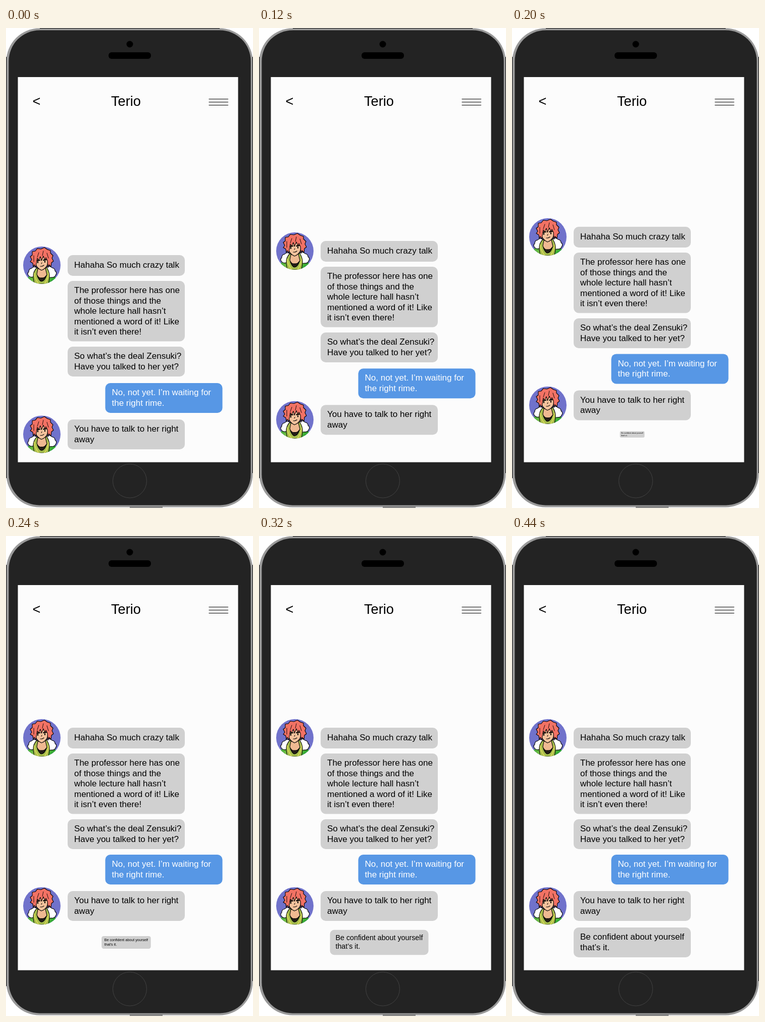
These frames come from a looping animation (489 by 949 pixels, 640 ms). An HTML page:

```html
<!DOCTYPE html>
<html lang="en">
<head>
<meta charset="utf-8">
<title>Chat</title>
<style>
  html, body { margin: 0; width: 100%; height: 100%; overflow: hidden; background: #fff; }
  svg { display: block; font: 17px "Liberation Sans", Arial, sans-serif; }
</style>
</head>
<body>
<svg width="489" height="949" viewBox="0 0 489 949">
  <defs>
    <clipPath id="round"><circle cx="37" cy="37" r="37"/></clipPath>
    <linearGradient id="coat" x1="0" x2="1" y1="0" y2=".3">
      <stop offset="0" stop-color="#1f9a35"/>
      <stop offset=".5" stop-color="#8fce4a"/>
      <stop offset="1" stop-color="#18a02c"/>
    </linearGradient>
    <g id="avatar" clip-path="url(#round)" stroke-linejoin="round" stroke-linecap="round">
      <rect width="74" height="74" fill="#7072cb"/>
      <g stroke="#000" stroke-width="1.1">
        <path d="M4 74L10 60L22 55H50L62 58L72 74Z" fill="url(#coat)" stroke="none"/>
        <path d="M27 42Q21 38 17 43Q11 44 11 50Q7 54 11 58Q14 62 20 60L25 61L29 50Z" fill="#fff"/>
        <path d="M46 41Q53 37 57 42Q63 43 63 48Q68 52 64 57Q62 62 56 61L49 62L43 50Z" fill="#fff"/>
        <path d="M27 42Q19 50 20 62L22 74H50L52 62Q53 50 46 41L37 48Z" fill="#a5bd4c"/>
        <path d="M29 44L27 55L34 68H39L47 56L44 43Z" fill="#efb991"/>
        <path d="M28 58Q31 67 36 69Q43 68 46 57Q42 63 37 62Q32 63 28 58Z" fill="#251f18"/>
        <path d="M22 53Q23 64 31 74M50 53Q49 65 42 74" fill="none" stroke="#d8d657" stroke-width="2"/>
        <path d="M24 22L25 36Q28 43 36 47Q45 44 48 36L50 20L38 12Z" fill="#f3c29c"/>
        <path d="M27 28L33 27M40 27L46 26" fill="none" stroke-width="2"/>
        <path d="M29 30V32M43 29V31" fill="none" stroke-width="2"/>
        <path d="M34 39Q38 40 41 37M37 32L36 34" fill="none"/>
        <path d="M20 40L19 33L14 30L17 26L14 20L18 17L18 10L24 9L28 4L35 5L42 2L48 6L54 8L54 13L59 18L57 23L60 29L56 32L55 40L51 36L49 42L48 28L45 22L43 27L40 19L36 28L34 20L30 28L28 23L26 34L25 41L22 36Z" fill="#f27264"/>
        <path d="M31 12L28 21M40 9L38 18M47 13L50 23M21 18L21 30" fill="none" stroke-width=".9"/>
      </g>
    </g>
  </defs>

  <rect x=".5" y=".5" width="488" height="947" rx="66" fill="#999"/>
  <path d="M67 .5H423M.5 57V890M488.5 57V880M245 947.5H310" stroke="#111" fill="none"/>
  <rect x="5.5" y="4.5" width="479" height="939" rx="61" fill="#232323"/>
  <circle cx="245" cy="32" r="6.5"/>
  <rect x="203" y="48" width="84" height="13" rx="6"/>
  <circle cx="245" cy="895.5" r="33.5" fill="none" stroke="#424242"/>
  <rect x="23.5" y="97" width="436" height="761.5" fill="#fcfcfc"/>

  <g font-size="27.2">
    <text x="52.5" y="154">&lt;</text>
    <text x="208" y="154">Terio</text>
  </g>
  <path d="M401.5 140.5H440M401.5 146.5H440M401.5 152.5H440" stroke="#000"/>

  <g id="upper"></g>
  <g id="lower"></g>
  <g id="reply"></g>
</svg>
<script>
const STEP = 40, LOOP = 640;
const GREY = '#d0d0d0', BLUE = '#5797e5';
const el = id => document.getElementById(id);

function bubble(x, y, h, base, lines, fill = GREY, ink = '#000') {
  const text = lines.map((s, i) =>
    `<text x="${x + 13}" y="${y + base + i * 20.4}" fill="${ink}">${s}</text>`).join('');
  return `<rect x="${x}" y="${y}" width="232" height="${h}" rx="10" fill="${fill}"/>${text}`;
}
const avatar = y => `<use href="#avatar" x="34" y="${y}"/>`;

el('upper').innerHTML = avatar(362) +
  bubble(122, 379, 41, 25, ['Hahaha So much crazy talk']) +
  bubble(122, 430, 119.5, 24.3, ['The professor here has one', 'of those things and the',
    'whole lecture hall hasn’t', 'mentioned a word of it! Like', 'it isn’t even there!']) +
  bubble(122, 560, 59, 24.3, ['So what’s the deal Zensuki?', 'Have you talked to her yet?']);
el('lower').innerHTML =
  bubble(196.5, 630, 59, 24.3, ['No, not yet. I’m waiting for', 'the right rime.'], BLUE, '#fff') +
  avatar(694.3) +
  bubble(122, 702, 59, 24.3, ['You have to talk to her right', 'away']);
el('reply').innerHTML =
  bubble(122, 774, 59, 24.3, ['Be confident about yourself', 'that’s it.']);

// [step, value] keys with straight lines between them
const slide = [[1, 1], [6, 0]];
const pop = [[4, 0], [9, 1.05], [11, 1]];

function valueAt(keys, n) {
  if (n <= keys[0][0]) return keys[0][1];
  for (let i = 1; i < keys.length; i++) {
    const [a, u] = keys[i - 1], [b, v] = keys[i];
    if (n <= b) return u + (v - u) * (n - a) / (b - a);
  }
  return keys[keys.length - 1][1];
}

function draw(ms) {
  const n = Math.floor((ms % LOOP) / STEP + 1e-6);
  const drop = valueAt(slide, n), size = valueAt(pop, n);
  el('upper').setAttribute('transform', `translate(0 ${70 * drop})`);
  el('lower').setAttribute('transform', `translate(0 ${72 * drop})`);
  el('reply').setAttribute('visibility', size ? 'visible' : 'hidden');
  el('reply').setAttribute('transform',
    size === 1 ? '' : `translate(238 803.5) scale(${size}) translate(-238 -803.5)`);
}

const start = performance.now();
function tick(now) {
  draw(Math.max(0, now - start));
  requestAnimationFrame(tick);
}
draw(0);
requestAnimationFrame(tick);
</script>
</body>
</html>
```
